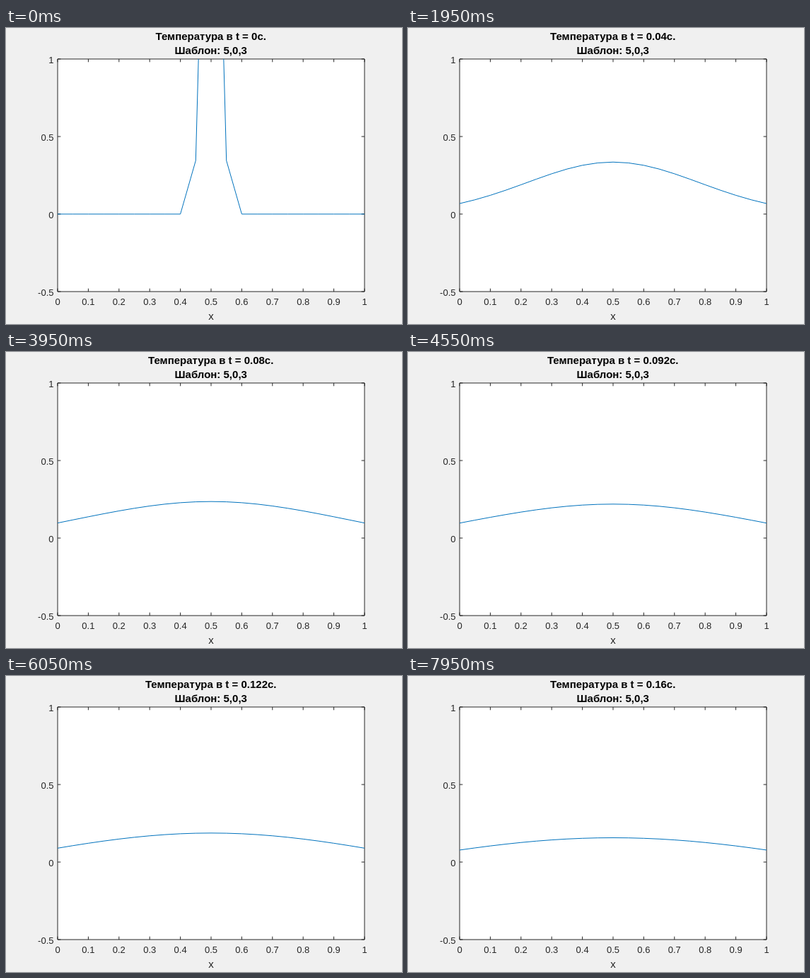
An HTML page for the animation above (8000 ms loop, 560x420 px).

```html
<!DOCTYPE html>
<html lang="ru">
<head>
<meta charset="utf-8">
<style>
  html, body { margin: 0; width: 100%; height: 100%; overflow: hidden; background: #f0f0f0; }
  svg { display: block; }
  text { font: 13px "Liberation Sans", Arial, sans-serif; fill: #262626; text-anchor: middle; }
  .title { font-size: 15px; font-weight: bold; fill: #000; }
  .name { font-size: 15px; }
  .num { text-anchor: end; }
  path, polyline { fill: none; stroke-width: 1; }
</style>
</head>
<body>
<svg width="560" height="420" viewBox="0 0 560 420">
  <defs><clipPath id="area"><rect x="72" y="44" width="436" height="330"/></clipPath></defs>
  <rect x="73" y="44" width="434" height="330" fill="#fff"/>
  <path id="axes" stroke="#262626"/>
  <polyline id="curve" stroke="#0072bd" clip-path="url(#area)"/>
  <g id="labels"></g>
  <text id="time" class="title" x="289.7" y="17"></text>
  <text class="title" x="289.7" y="37">Шаблон: 5,0,3</text>
  <text class="name" x="290" y="414">x</text>
</svg>
<script>
const $ = id => document.getElementById(id);
const px = x => 73 + 434 * x;
const py = u => 264 - 220 * u;

// Axes box, inward ticks and tick labels
const TICK = 4.34;
let axes = "M73 44H507V374H73Z", labels = "";
for (let i = 0; i <= 10; i++) {
  const x = px(i / 10);
  axes += `M${x} 374v${-TICK}M${x} 44v${TICK}`;
  labels += `<text x="${x}" y="393">${i / 10}</text>`;
}
for (const u of [-0.5, 0, 0.5, 1]) {
  axes += `M73 ${py(u)}h${TICK}M507 ${py(u)}h${-TICK}`;
  labels += `<text class="num" x="67.5" y="${py(u) + 6}">${u}</text>`;
}
$("axes").setAttribute("d", axes);
$("labels").innerHTML = labels;

// Heat equation on [-0.25, 1.25], zero at both ends, as a sine series
const CELLS = 30, LENGTH = 1.5, LAG = 0.0009;
const start = { 14: 0.345, 15: 4.02, 16: 0.345 };
const wave = (m, i) => Math.sin(Math.PI * m * i / CELLS);
const modes = [];
for (let m = 1; m < CELLS; m++) {
  let amp = 0;
  for (const i in start) amp += 2 / CELLS * start[i] * wave(m, i);
  modes.push({ m, amp, rate: (Math.PI * m / LENGTH) ** 2 });
}

function heat(i, t) {
  const age = Math.max(0, t - LAG);
  return modes.reduce((sum, k) => sum + k.amp * wave(k.m, i) * Math.exp(-k.rate * age), 0);
}

function draw(step) {
  const t = step * 0.002, points = [];
  for (let i = 0; i <= 20; i++) points.push(px(i / 20) + "," + py(heat(i + 5, t)).toFixed(3));
  $("curve").setAttribute("points", points.join(" "));
  $("time").textContent = `Температура в t = ${+t.toFixed(3)}с.`;
}

const begin = performance.now();
let shown = -1;
function tick() {
  const ms = (performance.now() - begin) % 8000;
  const step = Math.floor((ms + 50) / 100);
  if (step !== shown) draw(shown = step);
  requestAnimationFrame(tick);
}
tick();
</script>
</body>
</html>
```
